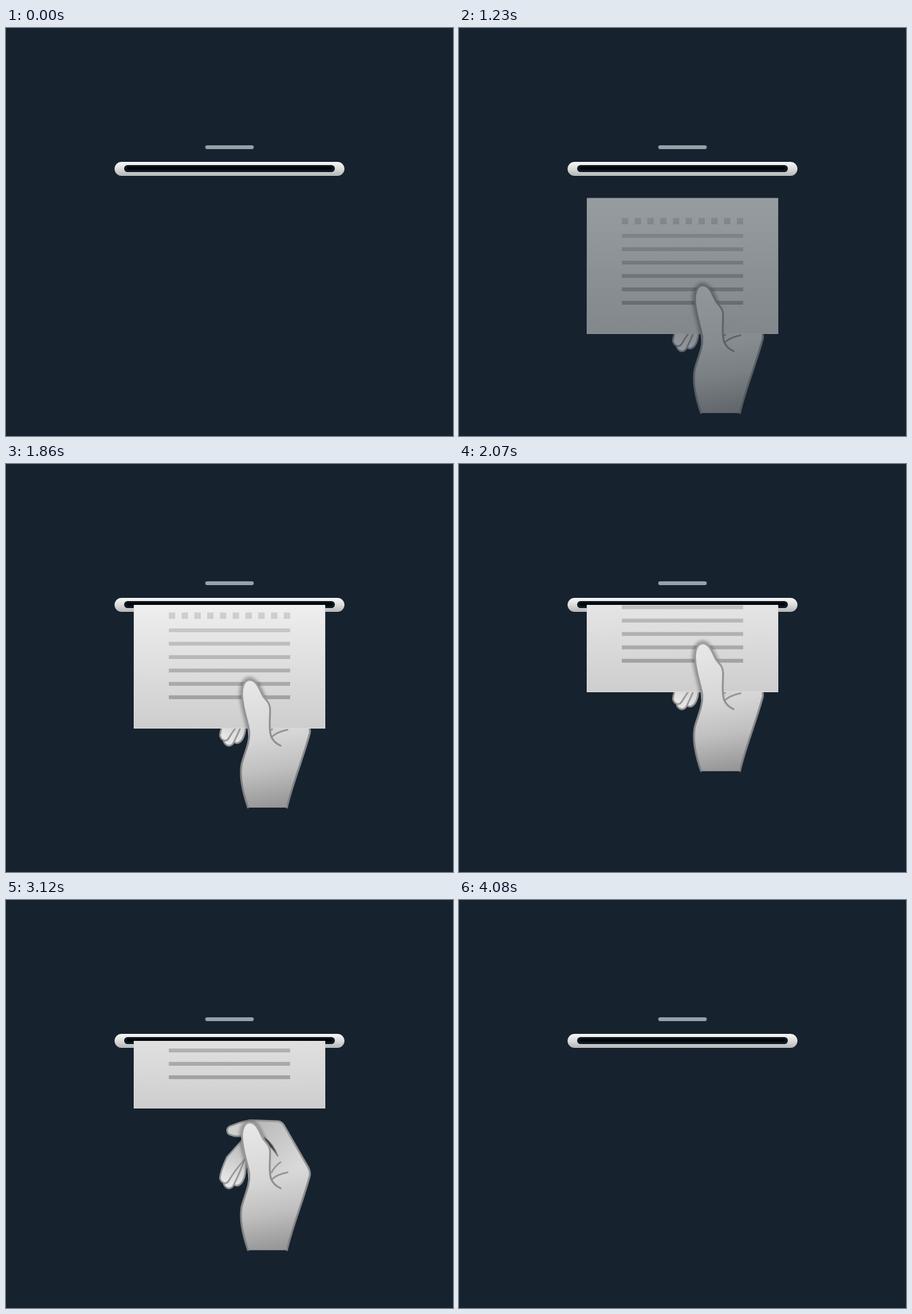
These frames come from a looping animation (700 by 640 pixels, 4.14 s). An HTML page:

```html
<!DOCTYPE html>
<html lang="en">
<head>
<meta charset="utf-8">
<title>Paper slot</title>
<style>
  html, body { margin: 0; width: 100%; height: 100%; overflow: hidden; background: #17222f; }
  svg { display: block; width: 700px; height: 640px; }

  .scene, .paper, .hand, .veil { animation: 4140ms ease-in-out infinite both; }
  .scene { animation-name: appear; }
  .paper { animation-name: feed; }
  .hand  { animation-name: push; }
  .veil  { animation-name: hide; }

  @keyframes appear {
    0%, 24.4% { opacity: 0; }
    34.06%, 100% { opacity: 1; }
  }
  @keyframes feed {
    0%, 35.02% { transform: translateY(0); }
    56.76%, 89.86% { transform: translateY(-153px); }
    98.31%, 100% { transform: translateY(-262px); }
  }
  @keyframes push {
    0%, 35.02% { transform: translateY(55px); }
    56.76%, 64.01% { transform: translateY(-98px); }
    83.33%, 100% { transform: translateY(53px); }
  }
  @keyframes hide {
    0%, 80.19% { opacity: 0; }
    89.61%, 100% { opacity: 1; }
  }

  .line { fill: none; stroke: url(#edge); stroke-width: 3; stroke-linecap: round; stroke-linejoin: round; }
  .finger { fill: url(#tip); stroke: #959697; stroke-width: 2.6; stroke-linejoin: round; }
</style>
</head>
<body>
<svg viewBox="0 0 700 640">
  <defs>
    <linearGradient id="rim" x2="0" y2="1">
      <stop offset="0" stop-color="#f6f7f7"/>
      <stop offset=".5" stop-color="#dcdcdc"/>
      <stop offset="1" stop-color="#b4b5b6"/>
    </linearGradient>
    <linearGradient id="sheet" x2="0" y2="1">
      <stop offset="0" stop-color="#f2f2f2"/>
      <stop offset="1" stop-color="#cecece"/>
    </linearGradient>
    <linearGradient id="ink" gradientUnits="userSpaceOnUse" x1="0" y1="298" x2="0" y2="434">
      <stop offset="0" stop-color="#d0d0d0"/>
      <stop offset="1" stop-color="#a1a1a1"/>
    </linearGradient>
    <linearGradient id="skin" gradientUnits="userSpaceOnUse" x1="385" y1="350" x2="418" y2="552">
      <stop offset="0" stop-color="#e8e8e8"/>
      <stop offset=".45" stop-color="#d6d6d6"/>
      <stop offset=".7" stop-color="#c0c0c0"/>
      <stop offset="1" stop-color="#949494"/>
    </linearGradient>
    <linearGradient id="edge" gradientUnits="userSpaceOnUse" x1="0" y1="345" x2="0" y2="549">
      <stop offset="0" stop-color="#9c9d9e"/>
      <stop offset="1" stop-color="#7c7e80"/>
    </linearGradient>
    <linearGradient id="shade" gradientUnits="userSpaceOnUse" x1="400" y1="345" x2="445" y2="425">
      <stop offset="0" stop-opacity=".2"/>
      <stop offset="1" stop-opacity="0"/>
    </linearGradient>
    <linearGradient id="tip" gradientUnits="userSpaceOnUse" x1="376" y1="375" x2="345" y2="440">
      <stop offset="0" stop-color="#b4b4b4"/>
      <stop offset="1" stop-color="#e6e6e6"/>
    </linearGradient>
    <filter id="soft" x="-50%" y="-20%" width="200%" height="140%"><feGaussianBlur stdDeviation="2.5"/></filter>
    <clipPath id="mouth"><rect y="221" width="700" height="419"/></clipPath>
  </defs>

  <rect width="700" height="640" fill="#17222f"/>
  <rect x="312" y="184" width="76" height="6" rx="3" fill="#98a0a8"/>

  <!-- slot -->
  <rect x="170" y="211" width="360" height="22" rx="11" fill="#101923"/>
  <rect x="170" y="210" width="360" height="22" rx="11" fill="url(#rim)"/>
  <rect x="185" y="215" width="330" height="11" rx="5.5" fill="#0d1924"/>
  <rect x="189" y="217.5" width="322" height="5" rx="2.5" fill="#020608"/>

  <g class="scene">
    <!-- palm and fingers, behind the paper -->
    <g class="hand">
      <path class="finger" d="M378 400C376 425 374 446 362 448C352 448 352 430 360 412Z"/>
      <path class="finger" d="M376 398C370 420 362 436 356 448C350 456 340 451 341 441L350 405Z"/>
      <path class="finger" d="M372 374L346 403C342 412 336 424 335 436C337 444 345 447 349 440C356 428 366 415 376 404Z"/>
      <path class="finger" style="fill:#cfcfcf" d="M382 345.5C372 346 360 351 350 355C344 359 346 366 351 368C358 371 364 371 372 370L385 360Z"/>
      <path id="palm" fill="url(#skin)" d="M381 345.5L426 347Q432 348 435 353L472 417Q478 427 475 435C464 475 446 520 440 549H379L380 440L372 365Z"/>
      <use href="#palm" style="fill:none"/>
      <path fill="url(#shade)" d="M381 345.5L426 347Q432 348 435 353L472 417Q478 427 475 435L414 450L372 365Z"/>
      <path class="line" d="M381 345.5L426 347Q432 348 435 353L472 417Q478 427 475 435C464 475 446 520 440 549"/>
      <path d="M405 372C416 380 422 391 426 402C420 393 413 385 405 381Z" fill="#353b42" stroke="#77797b" stroke-width="1.5"/>
      <path class="line" style="stroke-width:2.4" d="M430 411Q421 417 416 427M441 427Q424 430 414 440"/>
    </g>

    <g clip-path="url(#mouth)">
      <g class="paper">
        <rect x="200.5" y="267" width="299" height="212.5" fill="url(#sheet)" stroke="#d9dada" stroke-width="1"/>
        <g id="print" fill="url(#ink)"></g>
      </g>
    </g>

    <!-- thumb, in front of the paper -->
    <g class="hand">
      <path d="M379 428C378 412 368 390 368 368C369 352 376 347 382 347C394 349 399 365 404 376" fill="none" stroke="#000" stroke-opacity=".35" stroke-width="5" filter="url(#soft)"/>
      <path fill="url(#skin)" d="M379 549C369 520 366 498 369 481C373 464 382 448 381 430C379 414 370 394 369.500 370C370 354 376 348.500 382 348.500C395 350 398 368 404 376C410 383 413 386 413.500 394C414 408 411 424 415 437Q419 447 430 452L440 549Z"/>
      <path class="line" d="M379 549C369 520 366 498 369 481C373 464 382 448 381 430C379 414 370 394 369.500 370C370 354 376 348.500 382 348.500C395 350 398 368 404 376C410 383 413 386 413.500 394C414 408 411 424 415 437Q419 447 430 452"/>
    </g>
  </g>

  <rect class="veil" y="330" width="700" height="310" fill="#17222f"/>
</svg>
<script>
  const print = document.getElementById('print');

  function bar(x, y, width, height) {
    const rect = document.createElementNS('http://www.w3.org/2000/svg', 'rect');
    for (const [key, value] of Object.entries({ x, y, width, height })) rect.setAttribute(key, value);
    print.append(rect);
  }

  for (let i = 0; i < 10; i++) bar(255 + 20 * i, 298, 10, 10);
  for (let i = 0; i < 6; i++) bar(255, 323 + 21 * i, 190, 6);
</script>
</body>
</html>
```
